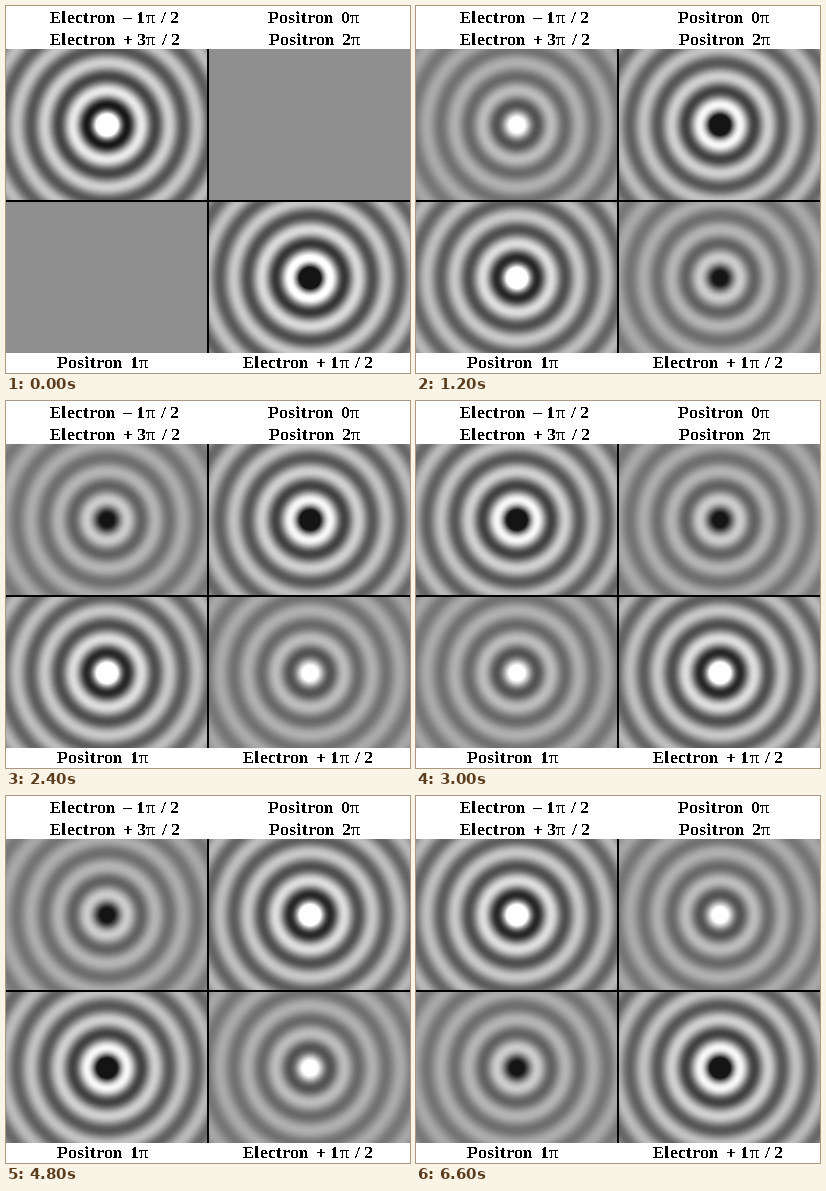
A matplotlib script for the animation above (7200 ms loop, 404x367 px).

```python
import numpy as np
import matplotlib.pyplot as plt
from matplotlib.animation import FuncAnimation

WIDTH, HEIGHT, DPI = 404, 367, 64
FRAMES, INTERVAL = 12, 600
PANEL_W, PANEL_H, GAP, TOP = 201, 151, 2, 43
WAVELENGTH, GAIN = 27.8, 235
DARK, MID, LIGHT = 20, 143, 255
FONT_PX = 17

plt.rcParams.update({
    "font.family": "Liberation Serif",
    "font.size": FONT_PX * 72 / DPI,
    "text.hinting": "native",
    "text.hinting_factor": 1,
    "text.antialiased": False,
})


def wave_profile():
    """Spherical standing wave, with its outer rings lifted for visibility."""
    y, x = np.mgrid[:PANEL_H, :PANEL_W]
    radius = np.hypot(x - PANEL_W / 2, y - PANEL_H / 2)
    phase = 2 * np.pi * radius / WAVELENGTH
    return np.sinc(phase / np.pi) * np.sqrt(phase + 1)


PROFILE = wave_profile()


def render(frame):
    angle = 2 * np.pi * frame / FRAMES
    c, s = np.cos(angle), np.sin(angle)
    stage = np.full((HEIGHT, WIDTH), 255.0)
    stage[TOP:TOP + 2 * PANEL_H + GAP] = 0
    for row, amplitudes in enumerate([(c, -s), (s, -c)]):
        for col, amplitude in enumerate(amplitudes):
            x = col * (PANEL_W + GAP)
            y = TOP + row * (PANEL_H + GAP)
            tone = MID + GAIN * amplitude * PROFILE
            stage[y:y + PANEL_H, x:x + PANEL_W] = np.clip(tone, DARK, LIGHT)
    return stage


fig = plt.figure(figsize=(WIDTH / DPI, HEIGHT / DPI), dpi=DPI)
ax = fig.add_axes([0, 0, 1, 1])
ax.axis("off")
image = ax.imshow(render(0), cmap="gray", vmin=0, vmax=255, aspect="auto",
                  interpolation="nearest", extent=(0, WIDTH, HEIGHT, 0))

# Bold label with a gap where a lighter pi is set: x, baseline, pi centre, text.
LABELS = [
    (44, 17, 144, "Electron  – 1    / 2"),
    (44, 39, 144, "Electron  + 3    / 2"),
    (262, 17, 348.5, "Positron  0"),
    (263, 39, 349.5, "Positron  2"),
    (51, 362, 137, "Positron  1"),
    (237, 362, 338, "Electron  + 1    / 2"),
]
for x, y, pi_x, label in LABELS:
    ax.text(x, y, label, weight="bold", ha="left", va="baseline")
    ax.text(pi_x, y, "π", ha="center", va="baseline")


def update(frame):
    image.set_data(render(frame))
    return [image]


animation = FuncAnimation(fig, update, frames=FRAMES, interval=INTERVAL,
                          repeat=True, repeat_delay=0)
plt.show()
```
